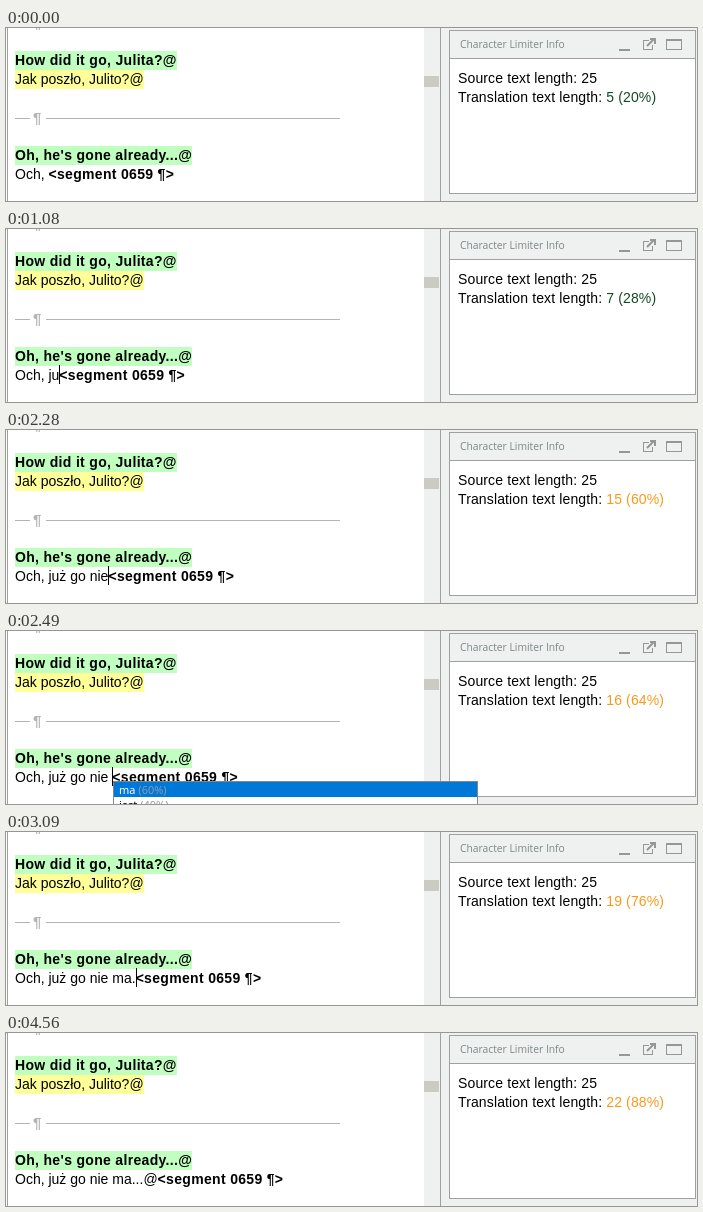
Write an HTML page that moves like this. It is 691x173 px and loops after 4.76 s.

```html
<!DOCTYPE html>
<html lang="en">
<head>
<meta charset="utf-8">
<title>Character limiter</title>
<style>
  html, body { margin: 0; width: 100%; height: 100%; overflow: hidden; }
  body { position: relative; background: #fff; color: #000;
    font: 14px/19px "Liberation Sans", Arial, sans-serif; }
  div, svg, #caret { position: absolute; white-space: pre; }
  svg { left: 0; top: 0; }
  b, .source { font-weight: bold; letter-spacing: .32px; }
  .row { left: 9px; height: 19px; }
  .source { background: #c0ffc0; }
  .target { background: #ffff99; }
  .mark { left: 27px; color: #b4b4b4; font-size: 15px; font-weight: bold; }
  .info { left: 452px; letter-spacing: .13px; }
  #caret { width: 1px; height: 19px; margin-top: -1px; background: #000; }
  #popup { left: 107px; top: 150px; width: 363px; height: 40px; border: 1px solid #828790;
    background: #fff; font: 11px/15px "Noto Sans", "Open Sans", sans-serif; }
  #popup div { left: 0; width: 358px; height: 15px; padding-left: 5px; }
  #popup span { color: #999; }
  #popup .picked { background: #0078d7; color: #fff; }
  #popup .picked span { color: #8c9aa8; }
  .title { left: 454px; top: 7px; color: #7c8888;
    font: 10.3px/19px "Open Sans", "Noto Sans", sans-serif; }
</style>
</head>
<body>
<svg width="691" height="173" shape-rendering="crispEdges">
  <path d="M1 0h1v173h-1z" fill="#a0a0a0"/>
  <path d="M9 90h15v1h-15zM40 90h294v1h-294z" fill="#b4b4b4"/>
  <path d="M418 0h273v173h-273z" fill="#eff0f0"/>
  <path d="M418 48h15v11h-15z" fill="#cbcbc3"/>
  <path d="M434 0h1v173h-1z" fill="#a0a0a0"/>
  <path d="M443.5 2.5h246v163h-246z" fill="#fff" stroke="#a0a0a0"/>
  <path d="M444 3h245v27h-245z" fill="#eff0f0"/>
  <path d="M443 30h247v1h-247z" fill="#a0a0a0"/>
  <g fill="none" stroke="#969696">
    <path d="M613 22h11M660 12h16" stroke-width="2"/>
    <path d="M643 12.5h-5.5v9h9v-5M660.5 11.5h15v10h-15z"/>
    <path d="M641 18l7-7M644 11h5v5" stroke-width="2" shape-rendering="auto"/>
  </g>
</svg>

<div class="mark" style="top:-15px">¶</div>
<div class="row source" style="top:23px">How did it go, Julita?@</div>
<div class="row target" style="top:42px">Jak poszło, Julito?@</div>
<div class="mark" style="top:80px">¶</div>
<div class="row source" style="top:118px">Oh, he's gone already...@</div>
<div class="row" style="top:137px"><span id="typed"></span><i id="caret"></i><b>&lt;segment 0659 ¶&gt;</b></div>

<div class="title">Character Limiter Info</div>
<div class="info" style="top:41px">Source text length: 25</div>
<div class="info" style="top:60px">Translation text length: <span id="count"></span></div>

<div id="popup"><div class="picked">ma <span>(60%)</span></div><div style="top:15px">jest <span>(40%)</span></div></div>

<script>
const LOOP = 4760, LIMIT = 25, LAG = 30, OPENING = "Och, ";

// Bursts of typing: start, pause between keys, text
const keys = [
  [860, 150, "ju"], [1410, 130, "ż "], [1715, 30, "go"], [1945, 0, " "], [2150, 45, "nie"],
  [2340, 0, " "], [2620, 140, "ma"], [3055, 0, "."], [3285, 130, ".."], [4075, 0, "@"]
].flatMap(([start, gap, text]) => [...text].map((char, i) => ({ at: start + i * gap, char })));

const el = id => document.getElementById(id);
const typed = el("typed"), caret = el("caret"), count = el("count"), popup = el("popup");
const textAt = t => OPENING + keys.filter(k => k.at <= t).map(k => k.char).join("");
const within = (t, from, to) => t >= from && t < to;
const show = (node, on) => node.style.visibility = on ? "visible" : "hidden";

function draw(t) {
  const percent = textAt(t - LAG).length * 100 / LIMIT;
  typed.textContent = textAt(t);
  count.textContent = `${percent * LIMIT / 100} (${percent}%)`;
  count.style.color = percent < 60 ? "#124a22" : "#f79a1c";
  show(caret, within(t, 200, 660) || within(t, 860, 3950) || within(t, 4075, 4555));
  show(popup, within(t, 2485, 2760));
}

const start = performance.now();
function tick() {
  draw((performance.now() - start) % LOOP);
  requestAnimationFrame(tick);
}
tick();
</script>
</body>
</html>
```
